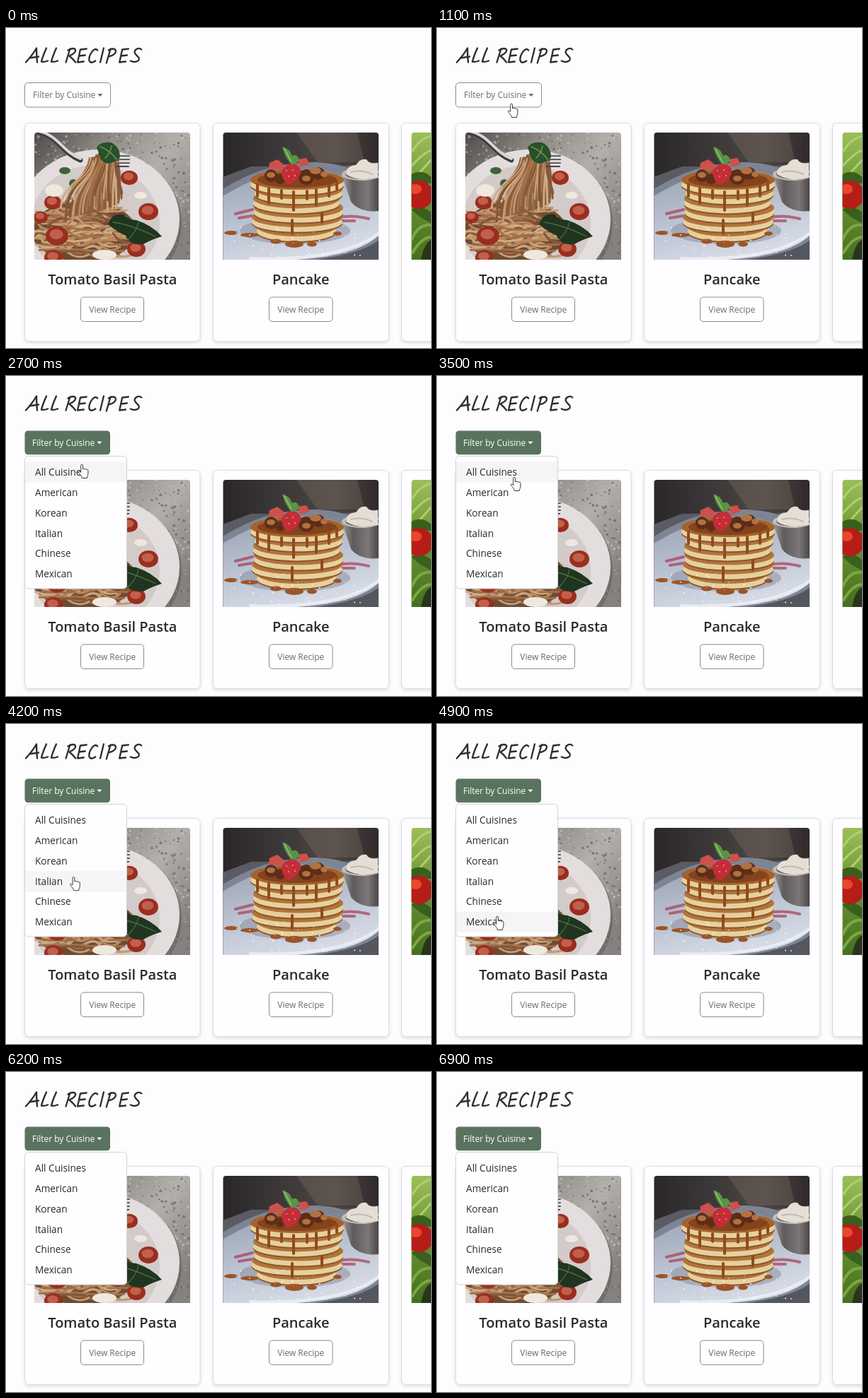
Write an HTML page that moves like this. It is 600 px wide and 453 px high and loops after 7 s.

```html
<!DOCTYPE html>
<html lang="en">
<head>
<meta charset="utf-8">
<title>All recipes</title>
<style>
  html, body { margin: 0; width: 100%; height: 100%; overflow: hidden; background: #fdfcfe; }
  svg { display: block; }
  text { font-family: "Open Sans", "Noto Sans", sans-serif; fill: #2b2b2b; }
  .card { fill: #fefdff; stroke: #dcdbde; filter: drop-shadow(0 2.5px 2.5px rgba(0, 0, 0, .12)); }
  .name { font-size: 20px; font-weight: 600; text-anchor: middle; }
  .btn { fill: #fefdff; stroke: #8a8e87; }
  .label { font-size: 12px; fill: #6b6e62; }
  .mid { text-anchor: middle; }
  .item { font-size: 13.65px; }
  .line { fill: none; stroke-linecap: round; stroke-linejoin: round; }
  .on .btn { fill: #5a735e; stroke: none; }
  .on .label, .on .caret { fill: #fff; }
  .caret { fill: #5f6660; }
</style>
</head>
<body>
<svg width="600" height="453" viewBox="0 0 600 453">
  <defs>
    <clipPath id="c1"><path d="M40 328V152q0-4 4-4H256q4 0 4 4V328Z"/></clipPath>
    <clipPath id="c2"><path d="M306.500 328V152q0-4 4-4H522q4 0 4 4V328Z"/></clipPath>
    <clipPath id="c3"><path d="M572.500 328V152q0-4 4-4H600V328Z"/></clipPath>
    <linearGradient id="stone" x2="1" y2=".7"><stop stop-color="#4f4c49"/><stop offset=".35" stop-color="#8f8c88"/><stop offset=".65" stop-color="#b3b0ac"/><stop offset="1" stop-color="#84817e"/></linearGradient>
    <linearGradient id="room" x2="1"><stop stop-color="#2a2729"/><stop offset=".35" stop-color="#3b3738"/><stop offset=".7" stop-color="#4d4643"/><stop offset="1" stop-color="#2f2a2a"/></linearGradient>
    <linearGradient id="dish" x2=".4" y2="1"><stop stop-color="#98a1b2"/><stop offset=".5" stop-color="#b7bfce"/><stop offset="1" stop-color="#d5dae5"/></linearGradient>
    <linearGradient id="steel" x2="1"><stop stop-color="#a09c9b"/><stop offset=".3" stop-color="#5f5b5b"/><stop offset=".7" stop-color="#7d7877"/><stop offset="1" stop-color="#474344"/></linearGradient>
    <linearGradient id="lettuce" x2="0" y2="1"><stop stop-color="#9cbf58"/><stop offset=".4" stop-color="#6f9a35"/><stop offset="1" stop-color="#446f1f"/></linearGradient>
  </defs>
  <rect width="600" height="453" fill="#fdfcfe"/>

  <g class="line" role="img" aria-label="ALL RECIPES" stroke="#2f2e2e" stroke-width="2.400" transform="translate(0 -.5)">
    <path d="M28 49Q38 38 43 29Q43 39 44 49M33 43L46 41"/>
    <path d="M57 29Q52 40 50 48Q54 49 59 47M71 29Q66 40 64 48Q68 49 73 47"/>
    <g transform="translate(6 0) scale(.97 1)">
      <path d="M87 30L81 49M84 32C95 25 101 34 86 40Q91 44 95 49"/>
      <path d="M111 30L102 31L98 49L107 48M100 40L109 39"/>
      <path d="M127 32C121 25 110 46 117 49Q120 50 124 47"/>
      <path d="M136 29L131 49M146 30L140 50M143 32C155 25 159 38 143 41"/>
      <path d="M172 30L163 31L159 49L168 48M161 40L170 39"/>
      <path d="M191 31C187 27 178 32 182 37C185 41 190 43 186 47Q181 50 175 47"/>
    </g>
  </g>

  <g id="filter">
    <rect id="fbox" class="btn" x="26.500" y="77.500" width="121" height="34.500" rx="4.500"/>
    <g id="ftext">
      <text class="label" x="38" y="99.300">Filter by Cuisine</text>
      <path class="caret" d="M129.300 93.300h7.200l-3.600 3.700Z"/>
    </g>
  </g>

  <g id="cards">
    <rect class="card" x="26.500" y="134.500" width="247.500" height="309" rx="6"/>
    <rect class="card" x="292.500" y="134.500" width="248" height="309" rx="6"/>
    <rect class="card" x="558.500" y="134.500" width="248" height="309" rx="6"/>

    <g clip-path="url(#c1)">
      <rect x="40" y="148" width="220" height="180" fill="url(#stone)"/>
      <g id="specks"></g>
      <ellipse cx="135" cy="276" rx="113" ry="102" fill="#5d5957" opacity=".5"/>
      <ellipse cx="131" cy="271" rx="114" ry="99" fill="#e3dedd"/>
      <ellipse cx="126" cy="276" rx="91" ry="82" fill="#d3cbc9"/>
      <g fill="#3d6337">
        <ellipse cx="83" cy="202" rx="8" ry="5"/><ellipse cx="95" cy="220" rx="6" ry="6"/><ellipse cx="47" cy="268" rx="8" ry="5"/>
      </g>
      <ellipse cx="110" cy="288" rx="74" ry="43" fill="#6d4a33"/>
      <g id="heap" class="line" stroke-width="3"></g>
      <g id="toms"></g>
      <g fill="#efe8df">
        <ellipse cx="68" cy="230" rx="13" ry="9"/><ellipse cx="139" cy="321" rx="17" ry="7"/><ellipse cx="190" cy="237" rx="9" ry="5"/>
      </g>
      <path fill="#8a603f" d="M124 182H157Q166 210 160 248Q120 268 82 266Q116 222 124 182Z"/>
      <g id="drape" class="line" stroke-width="2.700"></g>
      <path fill="#1f351f" d="M144 278Q150 261 166 264Q172 271 184 272Q206 279 220 295Q204 300 194 306Q174 308 169 294Q156 288 144 278Z"/>
      <path class="line" d="M151 275Q176 278 211 295M172 300Q185 287 187 275" stroke="#4c6d43" stroke-width="1.300"/>
      <path class="line" d="M46 147C74 154 80 177 105 187" stroke="#3d3b3b" stroke-width="7"/>
      <path class="line" d="M46 146C74 152 80 175 105 185" stroke="#d8d6d6" stroke-width="4"/>
      <path class="line" d="M156 181H174M156 186H174M156 191H174M155 196H173" stroke="#474443" stroke-width="2"/>
      <path class="line" d="M156 180H174M156 185H174M156 190H174" stroke="#c9c6c4" stroke-width=".9"/>
      <path fill="#28502a" d="M128 169Q134 160 148 162Q161 168 161 183Q155 191 143 192Q132 188 132 180Z"/>
      <path class="line" d="M133 168Q148 174 156 186M140 184Q147 178 149 167" stroke="#6c9657" stroke-width="1.500"/>
    </g>

    <g clip-path="url(#c2)">
      <rect x="306" y="148" width="221" height="180" fill="url(#room)"/>
      <path fill="#84746a" opacity=".3" d="M410 148H496L506 190H440Z"/>
      <path fill="#5b5c63" d="M306 211L346 196H470L527 190V328H306Z"/>
      <path fill="#7d8594" d="M306 228C346 204 377 192 432 190C480 190 512 208 527 226V328H306Z"/>
      <path fill="url(#dish)" d="M306 238C347 215 370 202 420 200C474 200 508 224 527 252V293C501 317 460 324 412 328H306Z"/>
      <path class="line" d="M345 326C422 329 490 319 527 290" stroke="#e9ecf3" stroke-width="4"/>
      <path fill="#55575e" d="M430 329Q500 321 527 300V329Z"/>
      <ellipse cx="408" cy="287" rx="78" ry="19" fill="#858b9b" opacity=".5"/>
      <path class="line" d="M470 268Q490 264 512 270M468 273H492M324 263L348 257M329 269L347 266" stroke="#a83c58" stroke-width="4" opacity=".7"/>
      <path fill="url(#steel)" d="M474 207Q500 219 527 207V259Q500 262 487 246Z"/>
      <ellipse cx="502" cy="207" rx="28" ry="9" fill="#c2bebb"/>
      <ellipse cx="503" cy="207" rx="24" ry="7" fill="#6b6564"/>
      <path fill="#e4ded5" d="M480 207Q480 195 494 194Q500 184 509 186Q512 193 525 191V211Q498 219 480 207Z"/>
      <path class="line" d="M487 204Q503 200 517 207" stroke="#c2b9ae" stroke-width="2"/>
      <g id="stack"></g>
      <path class="line" d="M355 221V238M371 227V248M389 230V241M406 232V258M425 231V242M438 229V251M456 222V238M467 217V228M404 272V291M446 262V275" stroke="#8f4b1c" stroke-width="4"/>
      <g fill="#5e2d18">
        <circle cx="374" cy="209" r="9"/><circle cx="424" cy="211" r="11"/><circle cx="441" cy="206" r="9"/><circle cx="387" cy="214" r="7"/>
      </g>
      <g fill="#b27240">
        <ellipse cx="437" cy="202" rx="8" ry="5"/><ellipse cx="424" cy="213" rx="6" ry="4"/><ellipse cx="374" cy="208" rx="6" ry="4"/><ellipse cx="449" cy="207" rx="5" ry="4"/>
      </g>
      <path fill="#cc5149" d="M372 191L383 186L393 194L389 202L371 199ZM411 186L424 184L429 193L416 197Z"/>
      <path fill="#c42d38" d="M389 202Q396 190 409 193Q421 200 413 211Q405 221 398 222Q389 215 389 202Z"/>
      <path class="line" d="M396 202h.1M405 201h.1M399 210h.1M408 209h.1" stroke="#f0a28b" stroke-width="1.800"/>
      <path fill="#599443" d="M403 193Q394 184 390 168Q401 171 404 181Q411 177 414 187Q410 193 403 193Z"/>
      <path class="line" d="M393 171L403 190" stroke="#a0cb78" stroke-width="1.300"/>
      <g fill="#9b5428">
        <ellipse cx="318" cy="290" rx="10" ry="3"/><ellipse cx="344" cy="293" rx="13" ry="3"/><ellipse cx="381" cy="302" rx="8" ry="3.500"/>
        <ellipse cx="407" cy="306" rx="13" ry="5"/><ellipse cx="432" cy="306" rx="7" ry="3.500"/><ellipse cx="468" cy="291" rx="6" ry="3"/>
      </g>
      <g id="sugar" fill="#f5f6fa"></g>
    </g>

    <g clip-path="url(#c3)">
      <rect x="572" y="148" width="30" height="180" fill="url(#lettuce)"/>
      <path class="line" d="M574 174Q584 157 600 153M573 195Q592 174 600 174M582 207L600 187" stroke="#b4cc79" stroke-width="3"/>
      <path fill="#38601c" d="M572 207Q588 199 600 211V220H572ZM572 257Q586 249 600 261V276L585 268Z"/>
      <circle cx="583" cy="236" r="20" fill="#b61d17"/>
      <ellipse cx="578" cy="228" rx="9" ry="7" fill="#e7482f"/>
      <path class="line" d="M573 299Q582 277 600 279M574 318Q586 297 600 296" stroke="#7fa640" stroke-width="4"/>
      <path fill="#28351a" d="M586 328Q590 305 600 300V328Z"/>
    </g>

    <text class="name" x="150.300" y="363">Tomato Basil Pasta</text>
    <text class="name" x="416.300" y="363">Pancake</text>
    <rect class="btn" x="105.500" y="381" width="89" height="34.500" rx="4.500"/>
    <rect class="btn" x="371.500" y="381" width="89.500" height="34.500" rx="4.500"/>
    <text class="label mid" x="150.300" y="403">View Recipe</text>
    <text class="label mid" x="416.300" y="403">View Recipe</text>
  </g>

  <g id="menu">
    <rect x="26.500" y="113.500" width="144" height="187.500" rx="5" fill="#fefdff" stroke="#d3d3d6"/>
    <rect id="hot" x="27" width="143" height="28.800" fill="#f5f4f6"/>
  </g>

  <path id="hand" fill="#fff" stroke="#303032" stroke-width=".95" stroke-linejoin="round"
    d="M-1.300 1.600C-1.300-.2 1.500-.2 1.500 1.600V7C1.500 5.800 4 5.800 4 7.200C4.200 6.200 6.500 6.300 6.500 7.800C6.700 6.900 8.900 7.100 8.900 8.600V13C8.900 16 7.300 17 7.300 19.500H.4C.4 17-2.500 14.500-4.400 11.700C-5.400 9.800-3.200 9.100-1.300 11.500Z"/>
  <path id="arrow" fill="#fff" stroke="#303032" stroke-width=".9" d="M0 0V14.500L3.400 11.300L5.600 16.400L7.800 15.500L5.600 10.500H10.200Z"/>
</svg>

<script>
const $ = id => document.getElementById(id);

let seed = 11;
const rnd = (a = 0, b = 1) => {
  seed = (seed * 16807) % 2147483647;
  return a + (b - a) * seed / 2147483647;
};
const pick = list => list[Math.floor(rnd(0, list.length))];
const add = (parent, tag, attrs, text) => {
  const el = document.createElementNS($('filter').namespaceURI, tag);
  for (const k in attrs) el.setAttribute(k, attrs[k]);
  if (text) el.textContent = text;
  return $(parent).appendChild(el);
};

for (let i = 0; i < 700; i++) {
  add('specks', 'circle', { cx: rnd(40, 260), cy: rnd(148, 328), r: rnd(.6, 2),
    fill: pick(['#474544', '#63615f', '#bbb9b5', '#d1cfcb']), opacity: .5 });
}

const noodle = ['#b98a60', '#c49a70', '#a27049', '#d0aa82', '#825637'];
for (let i = 0; i < 130; i++) {
  const a = rnd(0, 6.28), k = Math.sqrt(rnd());
  const x = 110 + 64 * k * Math.cos(a), y = 287 + 37 * k * Math.sin(a);
  const w = rnd(12, 30), h = rnd(-24, 26);
  add('heap', 'path', { d: `M${x - w} ${y}Q${x} ${y + h} ${x + w} ${y + h / 3}`, stroke: pick(noodle) });
}
for (let i = 0; i < 36; i++) {
  const u = i / 35, x = 118 + 40 * u + rnd(-3, 3), end = 79 + 84 * u + rnd(-6, 6);
  add('drape', 'path', {
    d: `M${x} ${rnd(178, 192)}C${x - 4} 212 ${end} 222 ${end} ${rnd(246, 280) - 25 * u}`, stroke: pick(noodle) });
}

for (const [x, y, r] of [[66, 247, 12], [49, 268, 10], [72, 294, 16], [174, 212, 12], [201, 260, 14], [184, 313, 13], [67, 325, 13]]) {
  add('toms', 'ellipse', { cx: x, cy: y, rx: r, ry: r * .85, fill: '#9a2e20' });
  add('toms', 'ellipse', { cx: x - 1, cy: y - 2, rx: r * .6, ry: r * .45, fill: '#c0604a' });
}

for (let i = 5; i >= 0; i--) {
  const y = 219 + i * 13.2, cx = 411 + [0, 2, -1, 2, 0, -1][i], rx = [66, 62, 61, 63, 64, 56][i];
  const oval = (dy, ry, fill) => add('stack', 'ellipse', { cx, cy: y + dy, rx, ry, fill });
  oval(5, 14, '#8d5528');
  oval(3, 14, '#e6d09d');
  oval(-4, 14, i ? '#b0743b' : '#a5622a');
}
add('stack', 'ellipse', { cx: 411, cy: 215, rx: 56, ry: 11, fill: '#84431d' });

for (let i = 0; i < 55; i++) {
  add('sugar', 'circle', { cx: rnd(320, 500), cy: rnd(280, 325), r: rnd(.4, 1.1) });
}

const rowH = 28.85, rowTop = 121.6;
['All Cuisines', 'American', 'Korean', 'Italian', 'Chinese', 'Mexican'].forEach((name, i) =>
  add('menu', 'text', { class: 'item', x: 41, y: 141 + i * rowH }, name));

// Pointer path: time, x, y
const track = [
  [800, 11, 150], [1000, 105, 107], [2500, 105, 107], [2900, 109, 143], [3600, 109, 143],
  [4700, 85, 272], [5100, 85, 272], [5400, 78, 246], [5500, 78, 246], [5700, 25, 236], [5800, 25, 236]
];
const LOOP = 7000, STEP = 100, OPEN = 2300;

function pointer(t) {
  const i = track.findIndex(p => p[0] > t);
  if (i < 1) return null;
  const [t0, x0, y0] = track[i - 1], [t1, x1, y1] = track[i];
  const u = (t - t0) / (t1 - t0), e = u * u * (3 - 2 * u);
  return [x0 + (x1 - x0) * e, y0 + (y1 - y0) * e];
}

const show = (id, on) => $(id).setAttribute('visibility', on ? 'visible' : 'hidden');
const move = (id, x, y) => $(id).setAttribute('transform', `translate(${x} ${y})`);

function draw(t) {
  const open = t >= OPEN, p = pointer(t);
  $('filter').setAttribute('class', open ? 'on' : '');
  $('fbox').setAttribute('width', open ? 120.5 : 121);
  $('fbox').setAttribute('height', open ? 33.8 : 34.5);
  move('ftext', open ? -1 : 0, open ? -.6 : 0);
  move('cards', 0, open ? -1 : 0);
  $('menu').style.display = open ? '' : 'none';

  const [x, y] = p || [-99, -99];
  const inX = x > 27 && x < 170;
  const row = Math.floor((y - rowTop) / rowH);
  const onRow = open && inX && row >= 0 && row < 6;
  const onBtn = x > 27 && x < 147 && y > 78 && y < 111;
  if (onRow) $('hot').setAttribute('y', rowTop + row * rowH);
  show('hot', onRow);
  show('hand', p && (onRow || onBtn));
  show('arrow', p && !onRow && !onBtn);
  move('hand', x, y);
  move('arrow', x, y);
}

const start = performance.now();
function tick() {
  const t = (performance.now() - start) % LOOP;
  draw(Math.floor(t / STEP) * STEP);
  requestAnimationFrame(tick);
}
tick();
</script>
</body>
</html>
```
